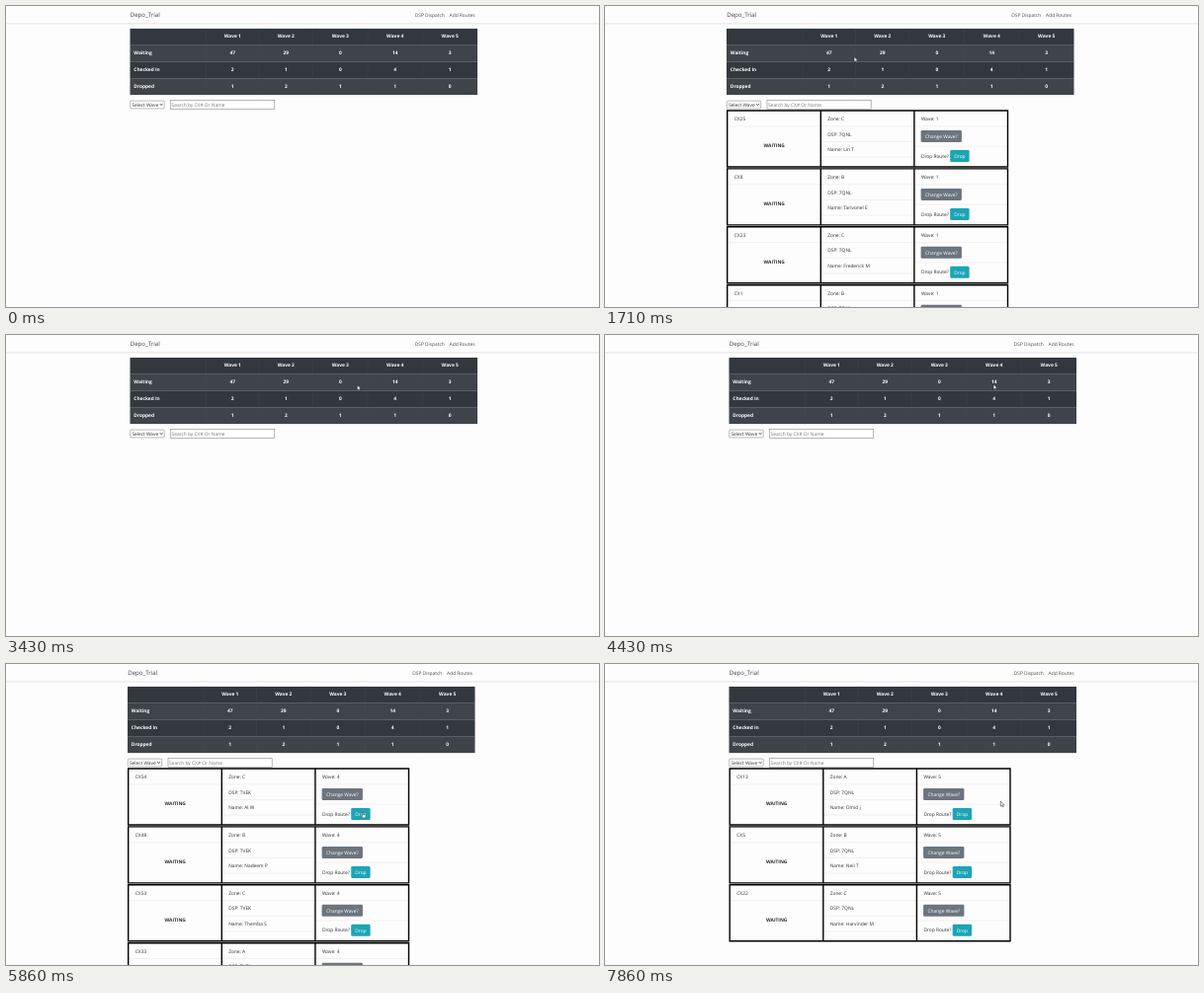
An HTML page for the animation above (8 s loop, 600x305 px).

```html
<!DOCTYPE html>
<html lang="en">
<head>
<meta charset="utf-8">
<title>Dispatch board</title>
<style>
  html, body { margin: 0; width: 100%; height: 100%; overflow: hidden; background: #fdfdfe; }
  svg { display: block; width: 100vw; height: 100vh; }
  text { font: 4.85px "Open Sans", "Noto Sans", sans-serif; fill: #2b2f33; text-rendering: geometricPrecision; white-space: pre; }
  .brand { font-size: 6.1px; fill: #3c3e41; }
  .link { fill: #4c4c4e; }
  .hint { fill: #757575; }
  .bold { font-weight: 700; }
  .light { fill: #fff; }
  .mid { text-anchor: middle; }
</style>
</head>
<body>
<svg id="stage" viewBox="0 0 600 305"></svg>
<script>
const LOOP = 8000, STEPS = 56;
const SCROLLBAR_SHIFT = -2.5;
const LEFT = 125.5, TABLE_TOP = 22.9, ROW = 16.8;
const CARD_TOP = 106, CARD_PITCH = 58.9, CARD_HEIGHT = 57, PANE = 94.6;
const CHANGE = { x: 322.1, y: 126, w: 41.3, label: "Change Wave?", fill: "#6c757d" };
const DROP = { x: 351.7, y: 146, w: 19.4, label: "Drop", fill: "#1ba5b5" };

const counts = {
  "Waiting": [47, 29, 0, 14, 3],
  "Checked In": [2, 1, 0, 4, 1],
  "Dropped": [1, 2, 1, 1, 0],
};

// Each route: code, zone, driver
const waves = {
  1: { dsp: "7QNL", routes: ["CX25,C,Lin T", "CX8,B,Tarivonel E", "CX23,C,Frederick M", "CX1,B,Paul W"] },
  2: { dsp: "7QNL", routes: ["CX31,A,Ivan S", "CX12,C,Marcus L", "CX40,B,Elena V", "CX17,C,Tom H"] },
  4: { dsp: "TVEK", routes: ["CX54,C,Al W", "CX48,B,Nadeem P", "CX53,C,Themba S", "CX33,A,Rosa N"] },
  5: { dsp: "7QNL", routes: ["CX13,A,Omid j", "CX5,B,Neil T", "CX22,C,Harvinder M"] },
};

// Waves 1 to 5 are picked in turn at these steps
const clicks = [11, 19, 24, 32, 51];

// Places the pointer eases between: step, x, y
const stops = [
  [3, 286, 165], [6, 127, 107], [10, 231, 52], [12, 252.1, 51.5], [18, 286, 49], [24, 355.4, 50.8],
  [32, 394.8, 49.9], [41, 359.4, 150], [44, 244, 264], [47, 438, 53], [49, 455, 45.4], [55, 400.3, 139],
];

const text = (x, y, str, cls = "") => `<text x="${x}" y="${y}" class="${cls}">${str}</text>`;
const rect = (x, y, w, h, fill, extra = "") =>
  `<rect x="${x}" y="${y}" width="${w}" height="${h}" fill="${fill}" ${extra}/>`;
const path = (d, stroke, width, fill = "none") =>
  `<path d="${d}" stroke="${stroke}" stroke-width="${width}" fill="${fill}"/>`;
const button = ({ x, y, w, label, fill }) =>
  rect(x, y, w, 12, fill, 'rx="1.3"') + text(x + w / 2, y + 7.8, label, "light mid");

function table() {
  const edges = [LEFT, 202.5, 256, 310.6, 366, 421.4, 477];
  const center = col => (edges[col] + edges[col + 1]) / 2;
  const width = edges[6] - LEFT;
  let out = "", lines = "";
  for (let row = 0; row < 4; row++) {
    const y = TABLE_TOP + row * ROW;
    out += rect(LEFT, y, width, ROW, row % 2 ? "#3e444a" : "#32383e");
    if (row) lines += `M${LEFT} ${y}h${width}`;
  }
  for (const x of edges.slice(1, -1)) lines += `M${x} ${TABLE_TOP}v${4 * ROW}`;
  out += path(lines, "#454d55", 0.35);
  for (let col = 1; col <= 5; col++) out += text(center(col), 32.1, "Wave " + col, "bold light mid");
  Object.entries(counts).forEach(([label, values], row) => {
    const y = 49.1 + row * ROW;
    out += text(129.3, y + 0.3, label, "bold light");
    values.forEach((value, i) => out += text(center(i + 1), y, value, "bold light mid"));
  });
  return out;
}

function filters() {
  return rect(125.8, 96.1, 34.4, 7.8, "#fff", 'stroke="#777" stroke-width=".5" rx=".6"')
    + text(127.4, 101.9, "Select Wave")
    + path("M155.9 99.3l1.2 1.2 1.2-1.2", "#111", 0.9)
    + rect(166.5, 95.6, 105.2, 8.8, "#fff", 'stroke="#8a8a8a" stroke-width=".6"')
    + text(167.5, 101.9, "Search by CX# Or Name", "hint");
}

function card(wave, dsp, route, index) {
  const [code, zone, name] = route.split(",");
  const left = LEFT + 0.7, [, second, third] = [0, 1, 2].map(i => left + i * PANE);
  const dividers = `M${left} 121.9H${left + 3 * PANE}M${second} 137.5h${PANE}m${-PANE} 15.6h${PANE}M${third} 142.2h${PANE}`;
  const frame = `M${left} ${CARD_TOP}h${3 * PANE}v${CARD_HEIGHT}h${-3 * PANE}z`
    + [second, third].map(x => `M${x} ${CARD_TOP}v${CARD_HEIGHT}`).join("");
  const details = ["Zone: " + zone, "DSP: " + dsp, "Name: " + name];
  return `<g transform="translate(0 ${index * CARD_PITCH})">`
    + path(dividers, "#dcdcde", 0.4) + path(frame, "#000", 1.4)
    + text(133.3, 116.1, code) + text(173.7, 142.9, "WAITING", "bold mid")
    + details.map((line, i) => text(227.7, 116.1 + i * 15.6, line)).join("")
    + text(322.4, 116.1, "Wave: " + wave) + button(CHANGE)
    + text(322.4, 153.7, "Drop Route?") + button(DROP)
    + "</g>";
}

const list = ([wave, { dsp, routes }]) =>
  `<g class="list" data-wave="${wave}">${routes.map((route, i) => card(wave, dsp, route, i)).join("")}</g>`;

const stage = document.getElementById("stage");
stage.innerHTML = `
  <defs><linearGradient id="shade" x2="0" y2="1">
    <stop stop-color="#e6e6e8"/><stop offset="1" stop-color="#fdfdfe"/>
  </linearGradient></defs>
  ${rect(0, 0, 600, 305, "#fdfdfe")}
  ${rect(0, 17.2, 600, 2.3, "url(#shade)")}
  <g id="page">
    ${text(125.7, 11, "Depo_Trial", "brand")}
    ${text(413.7, 10.6, "DSP Dispatch", "link")}
    ${text(448.6, 10.6, "Add Routes", "link")}
    ${table()}${filters()}${Object.entries(waves).map(list).join("")}
  </g>
  <g id="pointer">
    <g id="arrow">${path("M0 0V5.2L1.2 4.1 2 6 2.9 5.6 2.1 3.8H3.7Z", "#111", 0.45, "#fff")}</g>
    <g id="hand">${path("M1 .5Q1.6 0 2 .6V2.4L4.3 2.9Q5 3.2 4.8 4.2L4.2 6H1.8L.1 3.9Q.2 3.2 1 3.7Z", "#111", 0.45, "#fff")}</g>
  </g>`;

const [page, pointer, arrow, hand] = ["page", "pointer", "arrow", "hand"].map(id => document.getElementById(id));
const lists = [...document.querySelectorAll(".list")];
const show = (node, visible) => node.setAttribute("display", visible ? "inline" : "none");

function pointerAt(step) {
  const next = stops.findIndex(stop => stop[0] >= step);
  if (next <= 0) return stops[0].slice(1);
  const [s0, x0, y0] = stops[next - 1], [s1, x1, y1] = stops[next];
  const k = (step - s0) / (s1 - s0), eased = k * k * (3 - 2 * k);
  return [x0 + (x1 - x0) * eased, y0 + (y1 - y0) * eased];
}

function overButton(x, y, rows) {
  const row = Math.floor((y - CARD_TOP) / CARD_PITCH), localY = y - row * CARD_PITCH;
  return row >= 0 && row < rows
    && [CHANGE, DROP].some(b => x > b.x && x < b.x + b.w && localY > b.y && localY < b.y + 12);
}

function draw(time) {
  const step = Math.floor((time % LOOP + 4) * STEPS / LOOP) % STEPS;
  const wave = clicks.filter(click => click <= step).length;
  const rows = waves[wave]?.routes.length ?? 0;
  const shift = rows > 3 ? SCROLLBAR_SHIFT : 0;
  page.setAttribute("transform", `translate(${shift} 0)`);
  lists.forEach(node => show(node, +node.dataset.wave === wave));

  const [x, y] = pointerAt(step);
  const pressing = overButton(x - shift, y, rows);
  show(pointer, step > 0);
  show(arrow, !pressing);
  show(hand, pressing);
  pointer.setAttribute("transform", `translate(${x} ${y})`);
}

const begin = performance.now();
function tick() {
  draw(performance.now() - begin);
  requestAnimationFrame(tick);
}
tick();
</script>
</body>
</html>
```
